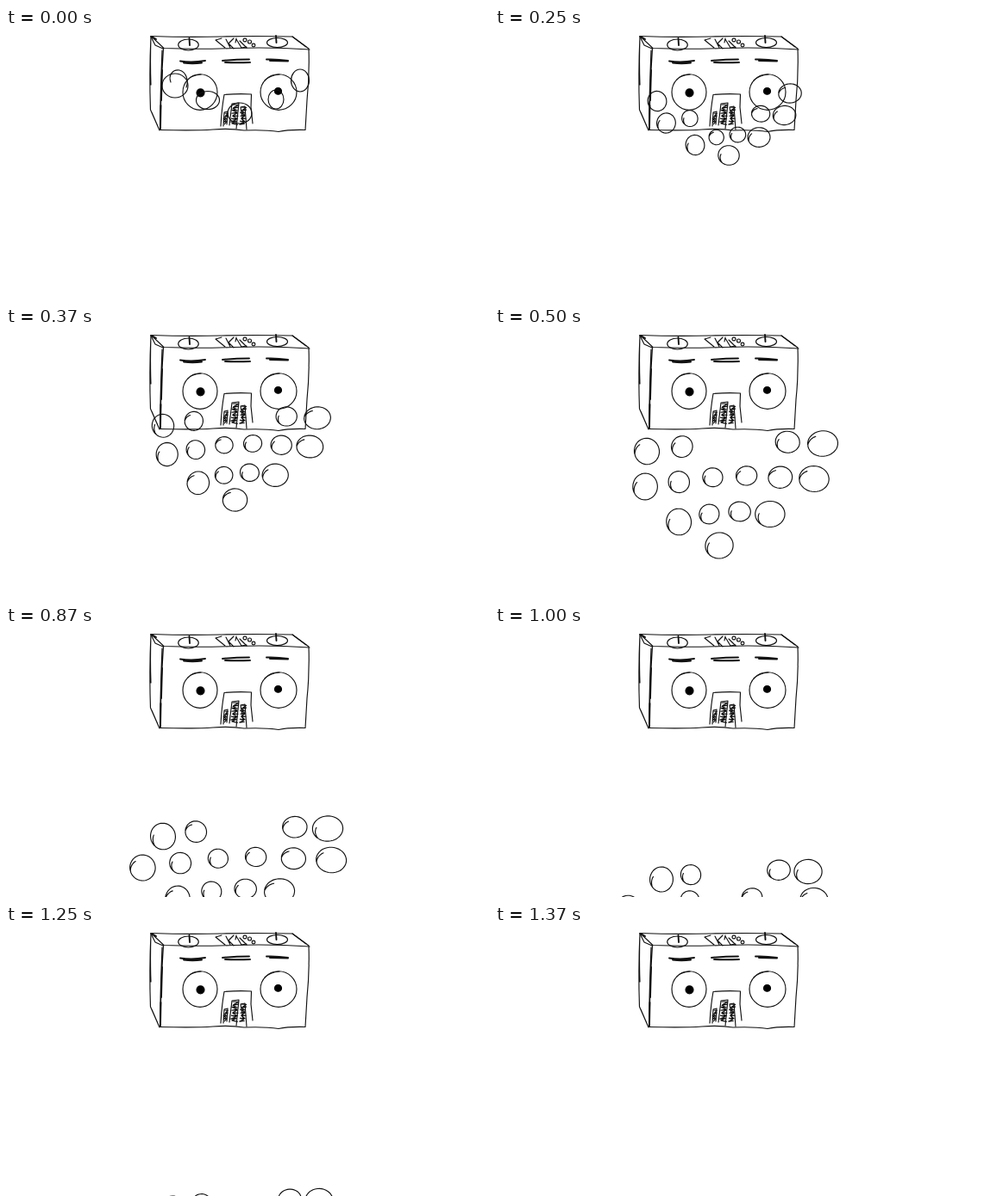
Write an HTML page that moves like this. It is 560 by 315 pixels and loops after 1.62 s.

```html
<!DOCTYPE html>
<html lang="en">
<head>
<meta charset="utf-8">
<title>Radio bubbles</title>
<style>
  html, body { margin: 0; width: 100%; height: 100%; overflow: hidden; background: #fff; }
  svg { display: block; width: 560px; height: 315px; }
  path, ellipse { fill: none; stroke: #111; stroke-width: 1.15; stroke-linecap: round; stroke-linejoin: round; }
  .bold { stroke-width: 1.9; }
  .solid { fill: #000; stroke: #000; }
</style>
</head>
<body>
<svg viewBox="0 0 560 315">
  <!-- cabinet -->
  <path d="M168 9.500Q210 11 250 10T332 10L351 24Q352 55 349 84L347 118.500Q327 118 316 120.500Q300 118 276 119Q260 116.500 240 118T179 118.500"/>
  <path d="M183 23.500Q220 25 264 23.500T352 25M332 10L348 22M168 9.500Q171 12 183 23.500M168 10L173 20L182 24"/>
  <path d="M168 9.500Q166 54 167.500 95L178 119L169 98M168 10Q167 40 168 66"/>
  <path d="M182.500 24L180 66L179 118M181 26Q179 75 178.500 118"/>
  <path class="bold" d="M181 49L180 84M179.500 90L179 117M169 10L174 13"/>
  <!-- dials and lettering -->
  <ellipse cx="211.500" cy="19.500" rx="11.800" ry="6.500"/>
  <ellipse cx="314.500" cy="17" rx="12" ry="5.500"/>
  <path class="bold" d="M212.500 12L213 20M313 9L313.500 17"/>
  <path d="M250 12L243 14L254 23M255 13L260 23M264 12L258 18L264 24M267 12L266 17M267 13L273 23L279 22M271 15L279 23"/>
  <ellipse cx="277" cy="14" rx="2" ry="1.900"/>
  <ellipse cx="282.500" cy="16" rx="2" ry="2"/>
  <ellipse cx="287" cy="20" rx="1.900" ry="1.900"/>
  <!-- brows -->
  <path class="bold" d="M202 38.500Q216 40.500 231 38M206 40.500Q216 42 227 40.500M251 38Q266 36.500 282 36.500M254 40Q267 40.500 283 40M302 36.500Q314 36 327 38M306 38L327 38.500"/>
  <!-- eyes -->
  <ellipse cx="225" cy="74.500" rx="20" ry="20.800"/>
  <ellipse cx="316" cy="74.500" rx="21" ry="20.800"/>
  <path d="M211 60Q215 55 226 54M300 61Q306 55 317 54"/>
  <ellipse class="solid" cx="225.500" cy="75.300" rx="4.500" ry="4.500"/>
  <ellipse class="solid" cx="315.500" cy="73.400" rx="4" ry="3.800"/>
  <!-- mouth -->
  <path d="M249 114Q250 94 253 77.500Q270 76 284.500 77L284 92L286 111"/>
  <path d="M252 114L253 98L257 97L256 112M259 113L262 88L270 87L267 117M279 118L277 91L272 92L275 109"/>
  <path id="teeth"/>
  <g id="welling">
    <ellipse cx="196" cy="67" rx="15" ry="14"/>
    <path d="M191 63C188 55 193 48 201 49C209 51 212 61 209 69"/>
    <ellipse cx="234" cy="84" rx="13.500" ry="10.500"/>
    <ellipse cx="271" cy="99" rx="14" ry="12"/>
    <ellipse cx="313" cy="83" rx="9" ry="11"/>
    <ellipse cx="341" cy="61" rx="10.500" ry="13"/>
  </g>
  <path id="bubbles"/>
</svg>
<script>
const byId = id => document.getElementById(id);
const polyline = points => 'M' + points.map(p => p.map(v => v.toFixed(1)).join(' ')).join('L');

// Dense zigzag shading of a tooth.
function scribble(x, y, width, height) {
  const points = [];
  for (let k = 0; k * 1.2 < height; k++) {
    points.push([x + (k % 2 ? width : 0) + Math.sin(k * 7) - k * 0.08, y + k * 1.2 + Math.sin(k * 4)]);
  }
  return polyline(points);
}
byId('teeth').setAttribute('d', scribble(253.5, 99, 3, 13) + scribble(263, 89, 6, 23) + scribble(273, 92, 5, 21));

// A pen stroke that begins inside the oval and overlaps its own start.
function ovalPath(x, y, rx, ry) {
  const start = 3.7 + 0.5 * Math.sin(x * 5);
  const points = [];
  for (let k = 0; k <= 46; k++) {
    const turn = k / 40;
    const angle = start - turn * 2 * Math.PI;
    const r = 1 - 1.6 * Math.max(0, 0.16 - turn) + 0.015 * Math.sin(2 * angle + x);
    points.push([x + rx * r * Math.cos(angle), y + ry * r * Math.sin(angle)]);
  }
  return polyline(points);
}

// The swarm is a funnel of rows: o is a bubble, - an empty slot.
// half: half width of the top row; flare: second row's width relative to it;
// lean: sideways shift per row.
const spilling = { top: 80.5, gap: 25.5, centre: 265, lean: 2, half: 77, flare: 0.89, scale: 0.74, rows: ['o----o', 'oo--oo', 'oooo', 'o'] };
const falling = { top: 140, gap: 41, centre: 278, lean: -6, half: 102, flare: 0.96, scale: 0.98, rows: ['oo--oo', 'oooooo', 'oooo', 'o'] };
const lower = { ...falling, top: 190, gap: 40, centre: 277, lean: -3.5, half: 106, flare: 1.02, scale: 1.04 };
const leaving = { top: 290, gap: 33, centre: 278, lean: -16, half: 85, flare: 1.27, scale: 0.92, rows: ['oo--oo', 'oooo'] };
const lastRow = { ...leaving, top: 325, rows: ['oo--oo'] };

function between(a, b, rows) {
  const pose = { rows };
  for (const key in a) if (key !== 'rows') pose[key] = (a[key] + b[key]) / 2;
  return pose;
}

function swarmPath({ top, gap, centre, lean, half, flare, scale, rows }) {
  const widths = [1, flare, flare * 0.54, 0];
  let d = '';
  rows.forEach((row, r) => [...row].forEach((slot, i) => {
    if (slot !== 'o') return;
    const lone = row.length === 1;
    const side = lone ? 0 : 2 * i / (row.length - 1) - 1;
    const outer = lone ? 1 : side * side;
    const rx = scale * (11.8 + 4.5 * outer + 1.5 * side);
    const x = centre + lean * r + half * widths[r] * side;
    const y = top + gap * r - 4.5 * side - 9 * (1 - Math.abs(side));
    d += ovalPath(x, y, rx, rx * (0.95 - 0.1 * side));
  }));
  return d;
}

const LOOP = 1620;
const timeline = [
  [0, ''],
  [250, swarmPath(spilling)],
  [370, swarmPath(between(spilling, falling, falling.rows))],
  [500, swarmPath(falling)],
  [750, swarmPath(lower)],
  [870, swarmPath(between(lower, leaving, lower.rows))],
  [1000, swarmPath(leaving)],
  [1250, swarmPath(lastRow)],
  [1370, '']
];

function draw(now) {
  const time = now % LOOP;
  const [, d] = timeline.findLast(([start]) => start <= time);
  byId('bubbles').setAttribute('d', d);
  byId('welling').style.display = time < 250 ? '' : 'none';
  requestAnimationFrame(draw);
}
draw(performance.now());
</script>
</body>
</html>
```
